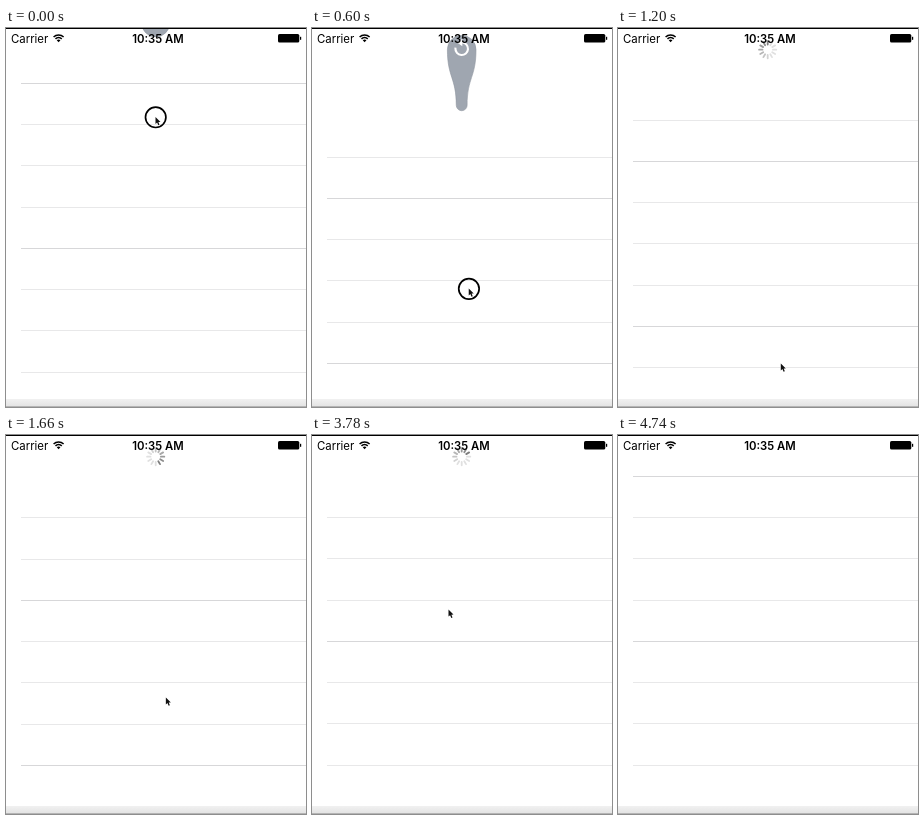
Animation, 300 px wide and 379 px high, one loop 4.76 s. Source, as an HTML page with a canvas:

```html
<!DOCTYPE html>
<html lang="en">
<head>
<meta charset="utf-8">
<title>Pull to refresh</title>
<style>
html, body { margin: 0; width: 100%; height: 100%; overflow: hidden; background: #fff; }
canvas { display: block; }
</style>
</head>
<body>
<canvas id="stage" width="300" height="379"></canvas>
<script>
const ctx = document.getElementById('stage').getContext('2d');
const W = 300, H = 379, LOOP = 4760, ROW = 41.25, CX = 149.7, CY = 21.7;
const SNAP = 690, RELEASE = 940, FINISH = 4200;

const clamp = v => Math.max(0, Math.min(1, v));
const progress = (t, start, end) => clamp((t - start) / (end - start));
const mix = (a, b, p) => a + (b - a) * p;
const easeOut = p => 1 - (1 - p) ** 3;
const easeInOut = p => p * p * (3 - 2 * p);

// [time, x, y, easing towards this point]
const pointerPath = [
  [0, 149.7, 89], [340, 149.7, 188], [820, 163, 322], [920, 163, 336, easeOut],
  [1180, 163, 336], [1640, 163, 274, p => p * p], [2180, 136.7, 175, easeOut],
  [4610, 136.7, 175], [4720, 9, 328, easeInOut]
];

function pointerAt(t) {
  let i = 1;
  while (i < pointerPath.length - 1 && t > pointerPath[i][0]) i++;
  const [t0, x0, y0] = pointerPath[i - 1];
  const [t1, x1, y1, ease = p => p] = pointerPath[i];
  const p = ease(progress(t, t0, t1));
  return { x: mix(x0, x1, p), y: mix(y0, y1, p) };
}

// Rubber-band resistance of the list under the finger
function dragOffset(y) {
  const d = y - 89;
  return 13.75 + 0.4394 * d - 0.000124 * d * (y - 188);
}

function listOffset(t) {
  if (t < RELEASE) return dragOffset(pointerAt(t).y);
  if (t < FINISH) {
    const extra = dragOffset(336) - ROW;
    return ROW + extra * Math.exp(-(t - RELEASE) / 125);
  }
  return ROW * (1 - easeOut(progress(t, FINISH, 4560)));
}

function drawRows(offset) {
  const snapped = Math.round(offset * 4) / 4;
  for (let i = 1; i < 10; i++) {
    const y = ROW * i + snapped;
    if (y >= 371) break;
    ctx.fillStyle = y % 1 === 0.25 ? '#d7d7d9' : '#e8e8e9';
    ctx.fillRect(15, Math.floor(y), W - 15, 1);
  }
}

function drawDrop(t, offset) {
  const p = progress(t, SNAP, 810);
  if (p === 1) return;
  const shrink = 1 - p;
  const length = Math.max(0, offset - 5 - 36) * shrink ** 2;
  const head = 14.3 * shrink;
  const tail = Math.max(1.5, 14.3 - 0.19 * length) * shrink;
  const y = Math.min(CY, offset - 19.3);
  const end = y + head + length - tail;
  const mid = (y + end) / 2;

  ctx.save();
  ctx.globalAlpha = shrink;
  ctx.beginPath();
  ctx.arc(CX, y, head, Math.PI, 0);
  ctx.bezierCurveTo(CX + head, mid, CX + tail, mid, CX + tail, end);
  ctx.arc(CX, end, tail, 0, Math.PI);
  ctx.bezierCurveTo(CX - tail, mid, CX - head, mid, CX - head, y);
  ctx.fillStyle = '#9fa6b0';
  ctx.fill();
  ctx.strokeStyle = '#8f969f';
  ctx.lineWidth = 0.6;
  ctx.stroke();

  ctx.translate(CX, y - 1);
  ctx.scale(shrink, shrink);
  ctx.strokeStyle = ctx.fillStyle = '#fff';
  ctx.lineWidth = 2.1;
  ctx.beginPath();
  ctx.arc(0, 0, 6.3, -1.5, 3.3);
  ctx.stroke();
  ctx.beginPath();
  ctx.moveTo(-4.6, -6.2);
  ctx.lineTo(0.6, -10);
  ctx.lineTo(0.6, -2.4);
  ctx.fill();
  ctx.restore();
}

function drawSpinner(t) {
  const size = easeOut(progress(t, 805, 1040)) * (1 - progress(t, FINISH, 4480));
  if (!size) return;
  const lead = Math.floor((t - 2860) / 100) + 5;
  ctx.save();
  ctx.translate(CX, CY);
  ctx.scale(size, size);
  ctx.rotate(progress(t, FINISH, 4480) * 2);
  ctx.lineWidth = 1.8;
  ctx.lineCap = 'round';
  for (let i = 0; i < 12; i++) {
    const age = (((lead - i) % 12) + 12) % 12;
    const gray = Math.round(mix(126, 224, clamp(age / 7)));
    const a = i * Math.PI / 6 - Math.PI / 2;
    ctx.strokeStyle = `rgb(${gray},${gray},${gray})`;
    ctx.beginPath();
    ctx.moveTo(5.2 * Math.cos(a), 5.2 * Math.sin(a));
    ctx.lineTo(8.6 * Math.cos(a), 8.6 * Math.sin(a));
    ctx.stroke();
  }
  ctx.restore();
}

function drawStatusBar() {
  ctx.fillStyle = ctx.strokeStyle = '#000';
  ctx.fillRect(0, 0, W, 1);
  ctx.textBaseline = 'alphabetic';
  ctx.textAlign = 'left';
  ctx.font = '400 11.4px Inter, sans-serif';
  ctx.fillText('Carrier', 5, 14.5);
  ctx.textAlign = 'center';
  ctx.font = '600 11.3px Inter, sans-serif';
  ctx.fillText('10:35 AM', 152, 14.5);

  ctx.lineWidth = 1.5;
  for (const r of [4.4, 7.1]) {
    ctx.beginPath();
    ctx.arc(52.6, 14, r, -Math.PI * 0.75, -Math.PI * 0.25);
    ctx.stroke();
  }
  ctx.beginPath();
  ctx.moveTo(52.6, 14.2);
  ctx.arc(52.6, 14.2, 2.6, -Math.PI * 0.75, -Math.PI * 0.25);
  ctx.fill();

  ctx.beginPath();
  ctx.roundRect(272, 6, 21.3, 8.6, 1.6);
  ctx.fill();
  ctx.fillRect(294, 8.8, 1.2, 3);
}

function drawBottomEdge() {
  const shade = ctx.createLinearGradient(0, 371, 0, H);
  shade.addColorStop(0, '#f1f1f1');
  shade.addColorStop(1, '#e2e2e2');
  ctx.fillStyle = shade;
  ctx.fillRect(0, 371, W, 8);
  ctx.fillStyle = '#b4b4b4';
  ctx.fillRect(0, 378, W, 1);
}

function drawPointer(t) {
  if (t >= 4735) return;
  const { x, y } = pointerAt(t);
  if (t < RELEASE) {
    ctx.strokeStyle = '#000';
    ctx.lineWidth = 1.7;
    ctx.beginPath();
    ctx.arc(x, y, 10.2, 0, Math.PI * 2);
    ctx.stroke();
  }
  ctx.save();
  ctx.translate(x - 0.2, y - 0.4);
  ctx.beginPath();
  for (const [px, py] of [[0, 0], [0, 7], [1.6, 5.6], [2.8, 8.3], [4, 7.8], [2.9, 5.1], [5, 5]]) {
    ctx.lineTo(px, py);
  }
  ctx.closePath();
  ctx.strokeStyle = '#fff';
  ctx.lineWidth = 1;
  ctx.stroke();
  ctx.fillStyle = '#111';
  ctx.fill();
  ctx.restore();
}

function render(t) {
  const offset = listOffset(t);
  ctx.fillStyle = '#fff';
  ctx.fillRect(0, 0, W, H);
  drawRows(offset);
  drawDrop(t, offset);
  drawSpinner(t);
  drawStatusBar();
  drawBottomEdge();
  drawPointer(t);
}

const start = performance.now();
function tick() {
  render((performance.now() - start) % LOOP);
  requestAnimationFrame(tick);
}
tick();
</script>
</body>
</html>
```
